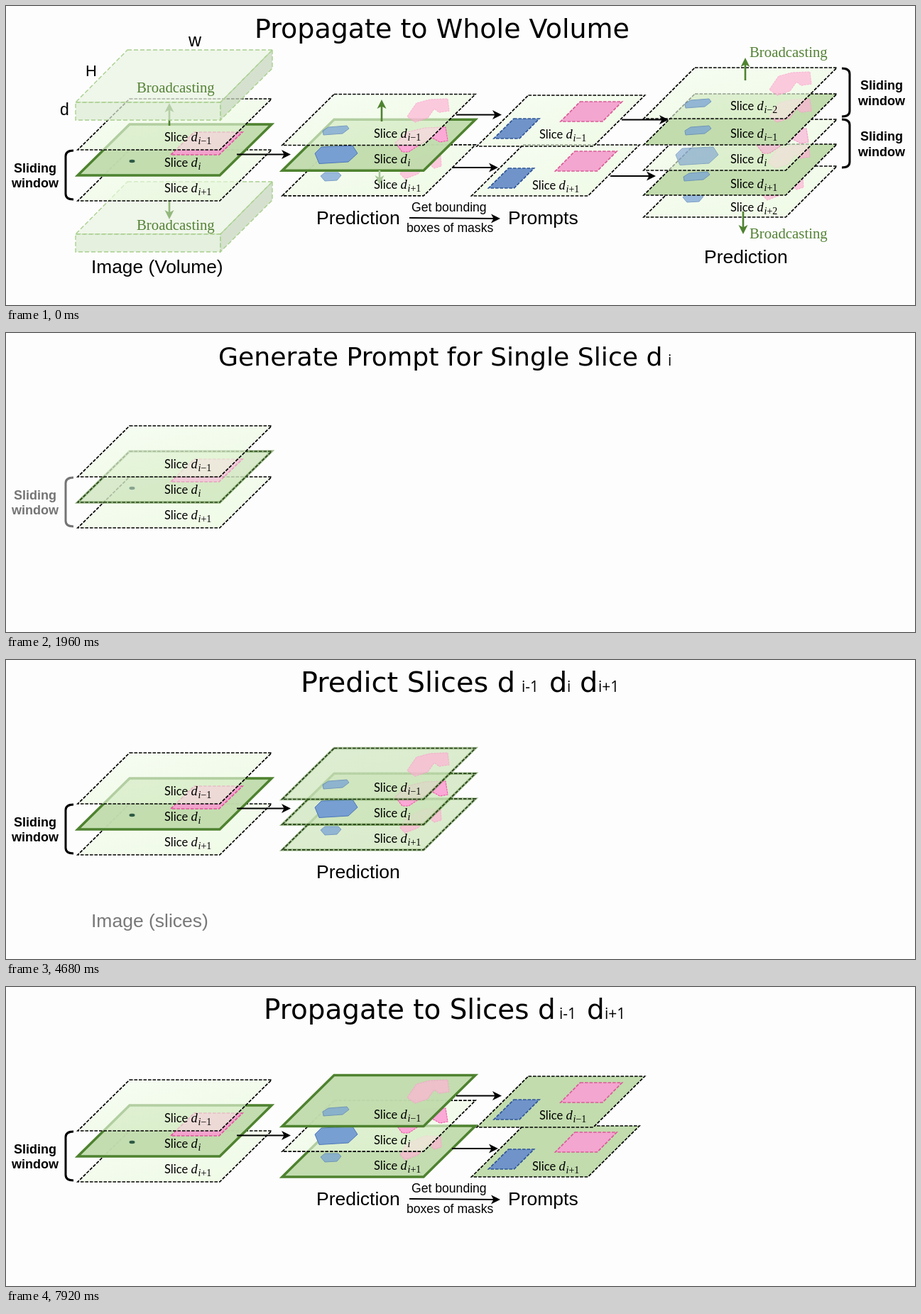
An HTML page that plays this animation: 1280 px wide and 422 px high, repeating every 8000 ms.

```html
<!DOCTYPE html>
<html lang="en">
<head>
<meta charset="utf-8">
<title>Slice propagation</title>
<style>
  html, body { margin: 0; width: 100%; height: 100%; overflow: hidden; background: #fdfdfd; }
  svg { display: block; width: 100%; height: 100%; }
  text { white-space: pre; }
  .title { font-family: "DejaVu Sans", sans-serif; }
  .sub { font: 21px "Open Sans", sans-serif; }
  .caption { font-family: "Liberation Sans", Arial, sans-serif; }
  .window { font: bold 18px "Liberation Sans", Arial, sans-serif; text-anchor: middle; }
  .label { font: 16.5px Lato, sans-serif; }
  .math { font: italic 18.5px "Liberation Serif", serif; }
  .index { font: 14px "Liberation Serif", serif; }
  .broadcast { font: 20.8px "Liberation Serif", serif; fill: #548235; }
</style>
</head>
<body>
<svg id="stage" viewBox="0 0 1280 422">
  <defs>
    <linearGradient id="pale" x1="0" y1="0" x2="1" y2="1">
      <stop offset="0" stop-color="#f3fcee"/>
      <stop offset="1" stop-color="#e6f9d6"/>
    </linearGradient>
  </defs>
</svg>
<script>
const GREEN = '#4e822f', SAGE = '#c2dcae';

// Drawing helpers, each returning SVG markup
const poly = (points, attrs) => `<polygon points="${points}" ${attrs}/>`;
const quad = (left, right, top, bottom, skew, attrs) =>
  poly([left + skew, top, right + skew, top, right, bottom, left, bottom], attrs);
const text = (x, y, cls, body, attrs = '') => `<text x="${x}" y="${y}" class="${cls}" ${attrs}>${body}</text>`;
const caption = (x, y, body, size = 26.5) => text(x, y, 'caption', body, `font-size="${size}"`);

const dashed = color => `stroke="${color}" stroke-width="1.7" stroke-dasharray="4.6 1.9"`;
const STYLE = {
  pale: `fill="url(#pale)" fill-opacity=".63" ${dashed('#000')}`,
  sage: `fill="${SAGE}" ${dashed('#000')}`,
  bold: `fill="${SAGE}" fill-opacity=".97" stroke="${GREEN}" stroke-width="3.5"`,
};

function arrow(x1, y1, x2, y2, color = '#000', width = 2) {
  const length = Math.hypot(x2 - x1, y2 - y1);
  const angle = Math.atan2(y2 - y1, x2 - x1) * 180 / Math.PI;
  return `<g transform="translate(${x1} ${y1}) rotate(${angle})" fill="${color}">
    <path d="M0 0H${length - 9}" stroke="${color}" stroke-width="${width}"/>
    <path d="M${length} 0l-13 -6.5l3.5 6.5l-3.5 6.5z"/></g>`;
}

function sliceLabel(x, y, offset) {
  return text(x, y, 'label', 'Slice') + text(x + 37.5, y, 'math', 'd') +
    text(x + 47.5, y + 4, 'index', `<tspan font-style="italic">i</tspan>${offset}`);
}

function bracket(x, top, bottom, dir) {
  const label = x + dir * 45, middle = (top + bottom) / 2;
  return `<path d="M${x - dir * 11} ${top}Q${x} ${top} ${x} ${top + 8}V${bottom - 8}Q${x} ${bottom} ${x - dir * 11} ${bottom}"
    fill="none" stroke="#000" stroke-width="3"/>` +
    text(label - (dir < 0 ? -2 : 0), middle - 4, 'window', 'Sliding') +
    text(label - (dir < 0 ? -2 : 0), middle + 17.5, 'window', 'window');
}

// Segmentation masks in the coordinates of the first prediction stack
const MASKS = {
  upper: {
    blue: [446,176, 454,171, 480,169, 483,173, 474,180, 447,182],
    pink: [565,156, 578,137, 597,132, 622,131, 624,148, 610,150, 603,145, 594,158, 576,164],
  },
  middle: {
    blue: [435,208, 444,199, 488,197, 495,208, 482,220, 441,222.5],
    pink: [548,193, 565,178, 590,172, 619,171, 622,190, 611,192, 600,186, 582,196, 567,206, 558,206],
  },
  lower: {
    blue: [443,240, 449,235, 468,235, 472,239, 466,246, 449,247],
    pink: [555,237, 563,222, 590,210, 612,211, 613,226, 603,229, 595,222, 580,237, 562,244],
  },
};
function masks(name, dx = 0, dy = 0, strong = false) {
  const { blue, pink } = MASKS[name];
  return `<g transform="translate(${dx} ${dy})" opacity="${strong ? 1 : .7}">` +
    poly(blue, `fill="${strong ? '#789fd2' : '#739fd6'}" stroke="#4d78b8" stroke-width="1"`) +
    poly(pink, `fill="${strong ? '#fba9d6' : '#ffb4d6'}" stroke="${strong ? '#f45fb0' : '#fb9dcb'}" stroke-width="1.2" stroke-dasharray="3 1"`) +
    '</g>';
}

function imageStack(active) {
  const slice = (i, style) => quad(101, 301, 131 + 36 * i, 203 + 36 * i, 73, style);
  const marks = quad(232, 300, 178, 210, 33, `fill="#f3a3cd" ${dashed('#e0559d')}`) +
    '<ellipse cx="177.5" cy="219" rx="4" ry="2.2" fill="#2d5a45"/>';
  return slice(2, STYLE.pale) + slice(1, active ? STYLE.bold : STYLE.pale) + (active ? marks : '') +
    slice(0, STYLE.pale);
}
const imageLabels = ['−1', '', '+1'].map((offset, i) => sliceLabel(223, 191 + 36 * i, offset)).join('');
const imageWindow = bracket(84, 204, 273, -1);
const activeImage = imageStack(true) + imageLabels + imageWindow;

function predictionStack(outerActive) {
  const slice = (i, active) =>
    quad(389, 588, 124.5 + 35.7 * i, 196.5 + 35.7 * i, 73, active ? STYLE.bold : STYLE.pale);
  return slice(2, outerActive) + masks('lower') +
    slice(1, !outerActive) + masks('middle', 0, 0, true) +
    slice(0, outerActive) + masks('upper') +
    ['−1', '', '+1'].map((offset, i) => sliceLabel(518, 186 + 36 * i, offset)).join('') +
    arrow(325, 209.5, 401, 209.5) + caption(437, 308, 'Prediction');
}

function prompts(style) {
  const prompt = (dx, dy, offset) => `<g transform="translate(${dx} ${dy})">` +
    quad(663, 827, 126, 198, 72.5, style) +
    quad(687, 723, 159, 187, 28, `fill="#7093c9" ${dashed('#2f5597')}`) +
    quad(781, 840, 135, 163, 27.5, `fill="#f3a6d0" ${dashed('#d95c98')}`) + '</g>';
  return prompt(-7.5, 70) + prompt(0, 0) +
    sliceLabel(751, 187, '−1') + sliceLabel(741, 259, '+1') +
    arrow(634, 153.5, 698, 153.5) + arrow(628, 228, 693, 228) +
    caption(571, 290, 'Get bounding', 17.6) + arrow(568, 299, 696, 300) +
    caption(564, 319, 'boxes of masks', 17.6) + caption(707, 308, 'Prompts');
}

function volume(top) {
  const edge = 'stroke="#a9d08e" stroke-width="1.4" stroke-dasharray="6 3" fill-opacity=".72"';
  return quad(98, 302, top, top + 74, 73, `fill="#eaf4e4" ${edge}`) +
    quad(98, 302, top + 74, top + 99, 0, `fill="#ddecd4" ${edge}`) +
    poly([375, top, 375, top + 26, 302, top + 99, 302, top + 74], `fill="#c6d7bd" ${edge}`);
}

function finalStack() {
  const slice = (top, style) => quad(898, 1098, top, top + 72, 72, style);
  return slice(226, STYLE.pale) + masks('lower', 510, 30) +
    slice(195, STYLE.sage) + masks('upper', 508, 65) +
    slice(160, STYLE.pale) + `<g opacity=".6">${masks('middle', 508, 2, true)}</g>` +
    slice(124, STYLE.sage) + masks('upper', 510, 0) +
    slice(87, STYLE.pale) + masks('upper', 510, -38) +
    [['−2', 147], ['−1', 186], ['', 222], ['+1', 257], ['+2', 290]]
      .map(([offset, y]) => sliceLabel(1020, y, offset)).join('') +
    arrow(867, 160.5, 933, 160.5) + arrow(851, 240, 915, 240) +
    arrow(1041, 105, 1041, 73, GREEN, 2.6) + text(1047, 72, 'broadcast', 'Broadcasting') +
    arrow(1038, 290, 1038, 322, GREEN, 2.6) + text(1047, 328, 'broadcast', 'Broadcasting') +
    bracket(1188, 88, 156, 1) + bracket(1188, 160, 228, 1) + caption(983, 363, 'Prediction');
}

const wholeVolume = () =>
  volume(248) + arrow(230, 274, 230, 301, '#93b87d', 2.6) +
  imageStack(true) + arrow(230, 169, 230, 137, GREEN, 2.6) + volume(62) +
  imageLabels + imageWindow +
  text(184, 122, 'broadcast', 'Broadcasting') + text(184, 316, 'broadcast', 'Broadcasting') +
  caption(257, 57, 'w', 25) + caption(112, 99, 'H', 22) + caption(76, 154, 'd', 23) +
  caption(120, 377, 'Image (Volume)', 26.3) +
  predictionStack(false) + arrow(529, 163, 529, 132, GREEN, 2.6) + arrow(526, 232, 526, 252, '#a9c69a', 2.6) +
  prompts(STYLE.pale) + finalStack();

// Titles are runs of [x, text, isSubscript]
const title = (size, y, ...runs) => runs.map(([x, body, sub]) =>
  text(x, y, sub ? 'sub' : 'title', body, sub ? '' : `font-size="${size}"`)).join('');
const singleTitle = title(36.2, 46, [299, 'Generate Prompt for Single Slice d'], [932, 'i', 1]);
const predictTitle = title(39.8, 45, [415, 'Predict Slices d'], [726, 'i-1', 1], [765, 'd'], [790, 'i', 1],
  [808, 'd'], [834, 'i+1', 1]);
const propagateTitle = title(38.9, 45, [363, 'Propagate to Slices d'], [779, 'i-1', 1], [818, 'd'], [843, 'i+1', 1]);

// Each scene fades in over the previous one between start and end (ms)
const scenes = [
  { start: -1, end: 0, body: title(38, 45, [350, 'Propagate to Whole Volume']) + wholeVolume() },
  { start: 360, end: 1120, body: singleTitle + imageStack(false) + imageLabels },
  { start: 1680, end: 2200, body: singleTitle + activeImage },
  { start: 2800, end: 3600, body: predictTitle + activeImage + predictionStack(false) + caption(120, 377, 'Image (slices)') },
  { start: 4320, end: 5080, body: predictTitle + activeImage + predictionStack(true) },
  { start: 5760, end: 6480, body: propagateTitle + activeImage + predictionStack(true) + prompts(STYLE.pale) },
  { start: 7240, end: 7920, body: propagateTitle + activeImage + predictionStack(true) + prompts(STYLE.sage) },
];

const stage = document.getElementById('stage');
stage.insertAdjacentHTML('beforeend', scenes.map(scene =>
  `<g class="scene"><rect width="1280" height="422" fill="#fdfdfd"/>${scene.body}</g>`).join(''));
const groups = [...stage.querySelectorAll('.scene')];

const LOOP = 8000, STEP = 40;
const begin = performance.now();
function draw() {
  const elapsed = (performance.now() - begin) % LOOP;
  const time = Math.floor(elapsed / STEP) * STEP;
  const progress = scenes.map(({ start, end }) => Math.max(0, Math.min(1, (time - start) / (end - start))));
  const base = progress.lastIndexOf(1);
  groups.forEach((group, i) => {
    group.style.display = i < base || !progress[i] ? 'none' : '';
    group.style.opacity = progress[i];
  });
  requestAnimationFrame(draw);
}
draw();
</script>
</body>
</html>
```
